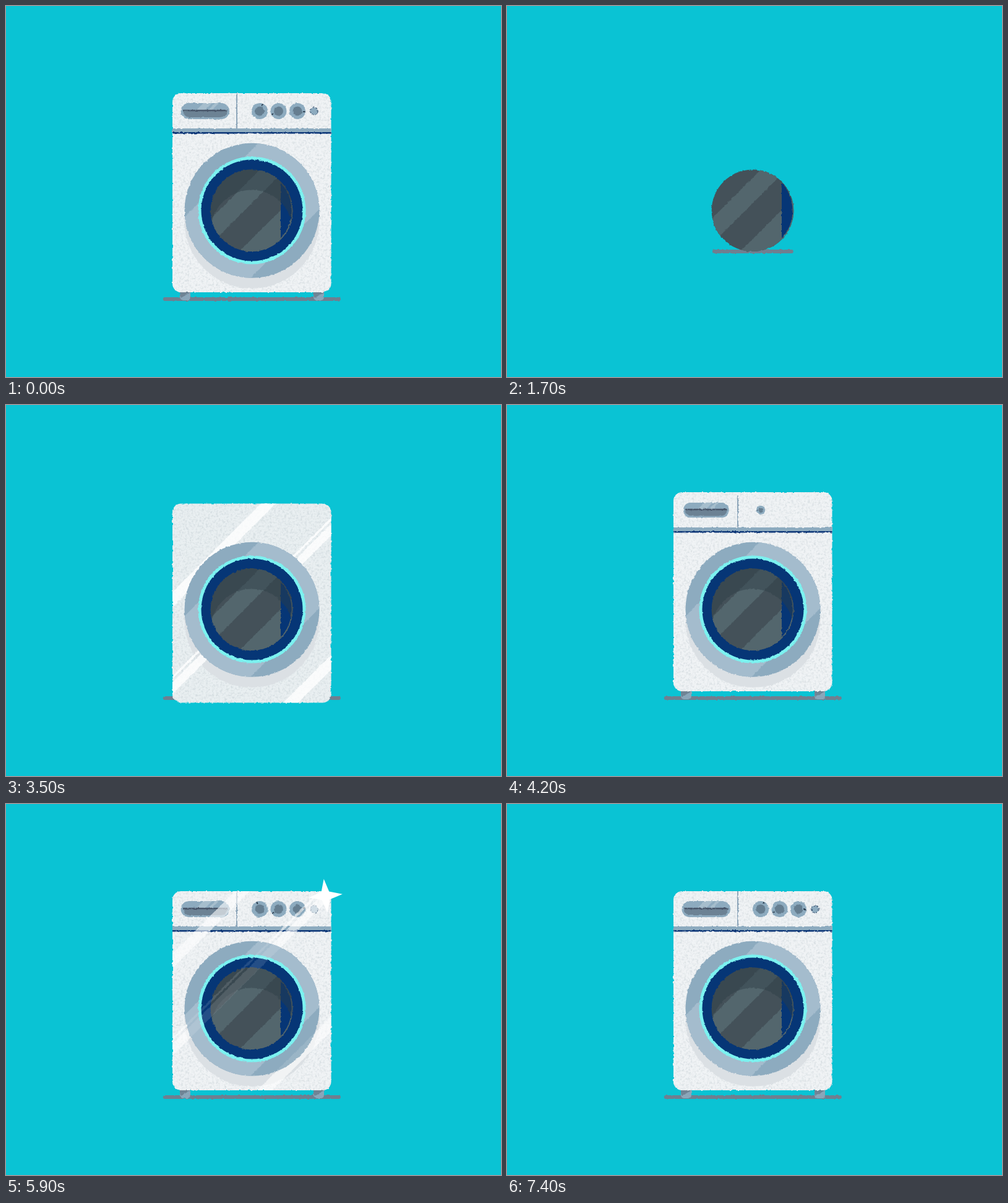
An HTML page that plays this animation: 800 px wide and 600 px high, repeating every 7.5 s.

```html
<!DOCTYPE html>
<html lang="en">
<head>
<meta charset="utf-8">
<title>Washing machine</title>
<style>
html, body { margin: 0; width: 100%; height: 100%; overflow: hidden; background: #0ac3d4; }
svg { display: block; width: 100vw; height: 100vh; }
</style>
</head>
<body>
<svg viewBox="0 0 800 600">
  <defs>
    <filter id="rough" filterUnits="userSpaceOnUse" x="0" y="100" width="800" height="400" color-interpolation-filters="sRGB">
      <feTurbulence id="boil" type="fractalNoise" baseFrequency=".22" numOctaves="2" seed="1"/>
      <feDisplacementMap in="SourceGraphic" scale="3" xChannelSelector="R" yChannelSelector="G"/>
    </filter>
    <filter id="grain" x="0" y="0" width="1" height="1" color-interpolation-filters="sRGB">
      <feTurbulence type="fractalNoise" baseFrequency=".3" numOctaves="3" seed="4"/>
      <feColorMatrix values="0 0 0 0 .64  0 0 0 0 .7  0 0 0 0 .73  .8 0 0 0 -.36"/>
      <feComposite in2="SourceAlpha" operator="in" result="dots"/>
      <feMerge><feMergeNode in="SourceGraphic"/><feMergeNode in="dots"/></feMerge>
    </filter>
    <clipPath id="bodyClip"><rect x="269" y="141" width="256.5" height="322" rx="14"/></clipPath>
    <clipPath id="doorClip"><circle cx="397.5" cy="330.8" r="109"/></clipPath>
    <clipPath id="glassClip"><circle cx="397" cy="330.8" r="66.3"/></clipPath>
    <clipPath id="segClip"><circle cx="396.6" cy="330.8" r="65"/></clipPath>
    <clipPath id="trayClip"><rect x="282.5" y="157" width="78.5" height="26" rx="13"/></clipPath>
    <g id="shine" fill="#fff"></g>
    <g id="foot">
      <path d="M281 460h17v10q0 6-6 6h-5q-6 0-6-6z" fill="#8aa6b9"/>
      <path d="M281 460h17v3l-15 9q-2-2-2-5z" fill="#6f8495"/>
    </g>
  </defs>

  <g id="art" filter="url(#rough)">
    <path id="ground" stroke="#6f7f90" stroke-width="6" stroke-linecap="round"/>
    <g id="feet"><use href="#foot"/><use href="#foot" x="216"/></g>
    <g id="body">
      <rect id="shell" x="269" y="141" width="256.5" height="322" rx="14" filter="url(#grain)"/>
      <g clip-path="url(#bodyClip)">
        <g id="strip">
          <path d="M269 201h257" stroke="#8dabbf" stroke-width="6"/>
          <path d="M269 205.2h257" stroke="#0b3576" stroke-width="2.4"/>
        </g>
        <path id="divider" stroke="#8ea6ba" stroke-width="2"/>
        <g id="tray">
          <g clip-path="url(#trayClip)">
            <rect x="282" y="157" width="80" height="26" fill="#8dabbf"/>
            <path d="M308 168l12-12h14l-12 12zM327 168l12-12h6l-12 12z" fill="#a6becd"/>
          </g>
          <path d="M286 169h72q-1 11-11 11h-50q-10 0-11-11z" fill="#6c8294"/>
          <path d="M286 169h72" stroke="#48566a" stroke-width="2.6"/>
        </g>
        <g id="knobs"></g>
        <circle id="lamp" cx="498" cy="170" r="6" fill="#8dabbf" stroke="#48627e" stroke-width="1.4" stroke-dasharray="3 2"/>
      </g>
    </g>
    <circle id="cast" cx="397.5" r="109" fill="#dbe0e4"/>
    <g id="sheen" clip-path="url(#bodyClip)"><use href="#shine"/></g>
    <g id="door">
      <circle cx="397.5" cy="330.8" r="109" fill="#8dabbf"/>
      <g clip-path="url(#doorClip)"><path id="doorLight" fill="#a4bccd"/></g>
    </g>
    <circle id="ring" cx="397.5" cy="330.6" fill="#063676"/>
    <circle id="seal" cx="397.5" cy="330.6" r="84.5" fill="none" stroke="#7cf2f0"/>
    <g id="glass">
      <g clip-path="url(#glassClip)">
        <rect x="330" y="263" width="136" height="136" fill="#445159"/>
        <path id="glassLight" fill="#53666d"/>
        <path d="M463.3 330.8a66.3 66.3 0 0 1-19.3 46.5" stroke="#53666d" stroke-width="3" fill="none"/>
        <rect x="444" y="260" width="30" height="140" fill="#063676" clip-path="url(#segClip)"/>
        <path id="shade" fill="#2d3c46" fill-rule="evenodd"/>
      </g>
    </g>
    <g id="doorSheen" clip-path="url(#doorClip)" opacity=".12"><use href="#shine"/></g>
  </g>
  <polygon id="star" fill="#fff"/>
</svg>
<script>
const LOOP = 7500, STEP = 100;
const NS = "http://www.w3.org/2000/svg";
const $ = id => document.getElementById(id);
const set = (el, attrs) => { for (const k in attrs) el.setAttribute(k, attrs[k]); };
const show = (el, on) => { el.style.display = on ? "" : "none"; };
const ease = p => (1 - Math.cos(Math.PI * p)) / 2;

// Eased value through alternating time, value pairs
function tween(t, ...k) {
  if (t <= k[0]) return k[1];
  for (let i = 2; i < k.length; i += 2) {
    if (t <= k[i]) return k[i - 1] + (k[i + 1] - k[i - 1]) * ease((t - k[i - 2]) / (k[i] - k[i - 2]));
  }
  return k[k.length - 1];
}
const pop = (t, start) => tween(t, start, 0, start + 200, 1.1, start + 350, 1);
const zoom = (el, x, y, s, dy = 0) => {
  show(el, s > 0);
  set(el, { transform: `translate(${x} ${y + dy}) scale(${s}) translate(${-x} ${-y})` });
};

// Diagonal band covering a <= x + y <= b
const band = (a, b) => `M${a} 0H${b}L${b - 600} 600H${a - 600}z`;

for (const [a, b] of [[0, 24], [136, 141], [146, 165], [358, 382]]) {
  const p = document.createElementNS(NS, "path");
  p.setAttribute("d", band(a, b));
  $("shine").append(p);
}
set($("doorLight"), { d: band(630, 835) });
set($("glassLight"), { d: band(675, 716) + band(774, 900) });

const knobs = [410, 440.5, 471].map(x => {
  const g = document.createElementNS(NS, "g");
  g.innerHTML = `<circle cx="${x}" cy="170" r="13" fill="#8dabbf"/>
    <circle cx="${x}" cy="170" r="7.5" fill="#667e90"/>
    <path d="M${x} 157.5v3.5" stroke="#2e4052" stroke-width="2"/>`;
  $("knobs").append(g);
  return { g, x, tick: g.lastElementChild };
});

function drawStar(t) {
  const size = tween(t, 4450, 0, 4700, 1, 6400, 1, 7050, 0);
  show($("star"), size > 0);
  const turn = 45 + (t - 5000) * 129 / 900;
  const pts = [];
  for (let i = 0; i < 8; i++) {
    const a = (turn + i * 45) * Math.PI / 180, r = size * (i % 2 ? 9 : 27.5);
    pts.push(`${516.5 + r * Math.sin(a)},${148.5 - r * Math.cos(a)}`);
  }
  set($("star"), { points: pts.join(" ") });
}

function drawPanel(t) {
  const wipe = tween(t, 3850, 0, 4200, 1);
  show($("strip"), wipe > 0);
  set($("strip"), { transform: `translate(269 0) scale(${wipe} 1) translate(-269 0)` });
  const drop = tween(t, 4000, 0, 4250, 57);
  show($("divider"), drop > 0);
  set($("divider"), { d: `M373 198v${-drop}` });
  zoom($("tray"), 322, 170, pop(t, 4050));
  const turns = [
    tween(t, 4200, -90, 5000, -10, 5900, -22, 7400, 25),
    tween(t, 4200, 120, 5000, 200, 5900, 236, 7400, 243),
    tween(t, 4200, 0, 5000, 85, 5900, 80, 7400, 95)
  ];
  knobs.forEach(({ g, x, tick }, i) => {
    zoom(g, x, 170, pop(t, 4100 + i * 80));
    set(tick, { transform: `rotate(${turns[i]} ${x} 170)` });
  });
  zoom($("lamp"), 498, 170, pop(t, 4340));
}

function drawShine(t) {
  const first = t < 4200;
  const x = first ? t - 2947 : t - 5389;
  const on = x > 0 && x < 1050;
  show($("sheen"), on);
  show($("doorSheen"), on && !first);
  set($("shine"), { transform: `translate(${x} 0)` });
  set($("sheen"), { opacity: first ? .8 : .6 });
}

function draw(time) {
  // The opening pose equals the last one
  const t = time < STEP ? LOOP - STEP : time;
  show($("art"), t >= 800);
  drawStar(t);
  if (t < 800) return;
  set($("boil"), { seed: 1 + time / STEP % 4 });

  const slide = -467 * Math.pow(1 - Math.min(1, (t - 700) / 1000), 2.2);
  set($("glass"), { transform: `translate(${slide} 0)` });

  const half = tween(t, 1900, 65.5, 2250, 79, 2500, 76.5, 2900, 76.5, 3400, 143.5) - 3;
  const floor = tween(t, 1900, 397, 2250, 414, 2900, 414, 3400, 474);
  set($("ground"), { d: `M${397.3 + slide - half} ${floor}h${2 * half}` });

  const ring = tween(t, 1900, 64, 2300, 79, 2500, 90, 2650, 88, 2800, 88, 3000, 86);
  show($("ring"), t > 1900);
  set($("ring"), { r: ring });
  const depth = tween(t, 2050, 0, 2500, 33);
  set($("shade"), {
    d: `M300 240h200v160h-200zM330.7 ${330.8 + depth}a66.3 66.3 0 0 1 132.6 0v99h-132.6z`,
    opacity: depth / 33 * .45
  });

  const seal = tween(t, 2750, 0, 3000, 5);
  show($("seal"), seal > 0);
  set($("seal"), { "stroke-width": seal });
  zoom($("door"), 397.5, 330.8, t < 2700 ? 0 : tween(t, 2700, .78, 2950, 1.03, 3100, 1));

  const scale = t < 2900 ? 0 : tween(t, 2850, .3, 3100, .945, 3200, 1.018, 3350, 1);
  const lift = tween(t, 3600, 18.5, 3950, 0);
  zoom($("body"), 397.25, 302, scale, lift);
  zoom($("sheen"), 397.25, 302, scale, lift);
  const tone = tween(t, 3500, 0, 4000, 7);
  set($("shell"), { fill: `rgb(${233 + tone},${239 + tone * .6},${241 + tone * .5})` });
  show($("cast"), t > 3000);
  set($("cast"), { cy: 330.8 + tween(t, 3000, 0, 3300, 17) });
  show($("feet"), t > 3500);
  drawPanel(t);
  drawShine(t);
}

let last = -1;
function tick() {
  const time = Math.floor(performance.now() % LOOP / STEP) * STEP;
  if (time !== last) draw(last = time);
  requestAnimationFrame(tick);
}
tick();
</script>
</body>
</html>
```
